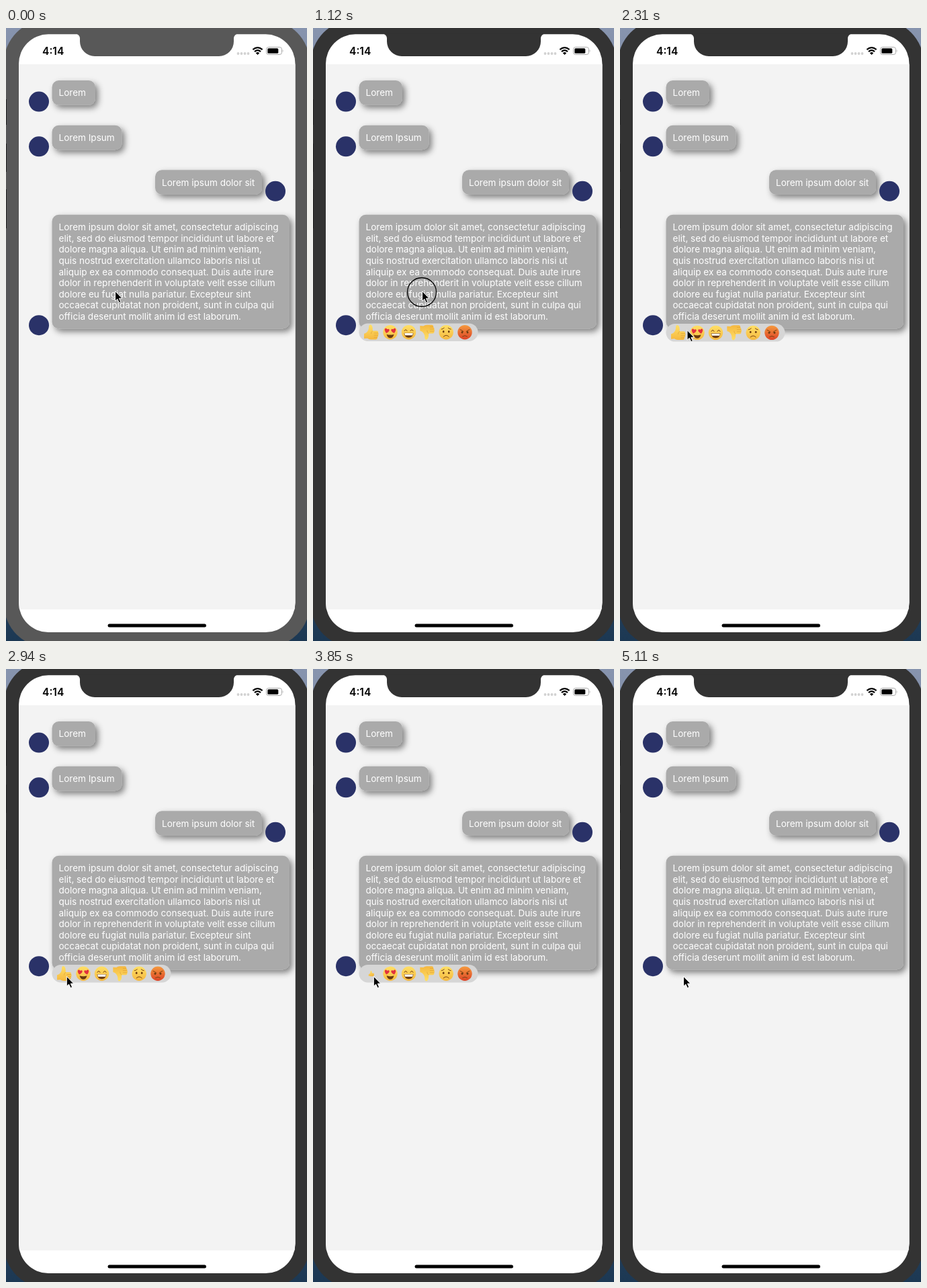
Recreate the animation shown at these times as an HTML page. Size 448 px wide and 912 px high, loop 5.18 s.

```html
<!DOCTYPE html>
<html lang="en">
<head>
<meta charset="utf-8">
<title>Chat reactions</title>
<style>
  html, body { margin: 0; width: 100%; height: 100%; overflow: hidden; }
  svg { display: block; width: 100%; height: 100%; }
  text { font-family: Inter, "Liberation Sans", sans-serif; white-space: pre; }
  .bubble text { font-size: 13.56px; fill: #fff; }
  .bubble rect { fill: #aaa; filter: url(#shadow); }
  .line { fill: none; stroke: #7a4312; stroke-width: 1; stroke-linecap: round; }
  .dark { fill: #6b3a10; }
</style>
</head>
<body>
<svg viewBox="0 0 448 912" xmlns="http://www.w3.org/2000/svg">
  <defs>
    <linearGradient id="wallpaper" x2="0" y2="1">
      <stop stop-color="#8794ae"/><stop offset="1" stop-color="#1c3853"/>
    </linearGradient>
    <linearGradient id="yellow" x2="0" y2="1">
      <stop stop-color="#ffe066"/><stop offset="1" stop-color="#f5b840"/>
    </linearGradient>
    <linearGradient id="red" x2="0" y2="1">
      <stop stop-color="#f59a3e"/><stop offset="1" stop-color="#dd4327"/>
    </linearGradient>
    <filter id="shadow" filterUnits="userSpaceOnUse" x="0" y="50" width="448" height="440">
      <feDropShadow dx="4" dy="4.5" stdDeviation="4.8" flood-opacity=".48"/>
    </filter>
    <clipPath id="screen"><rect x="19" y="9.3" width="411.5" height="889.7" rx="44"/></clipPath>

    <g id="thumb">
      <path fill="url(#yellow)" d="M-11 2C-7 1-5-2-4.2-5C-3.7-7.5-4.4-11-2-11.3C1-11.5 2.2-7 1.7-2.2H7.5Q10.5-2 10 .8Q11.5 2.2 10 4.2Q10.8 6 8.8 7.4Q9.2 10.5 6.5 10.7H-1Q-4 10.7-6 9L-11 9.3Z"/>
      <path class="line" style="stroke:#d99a30;stroke-width:.6" d="M4 1.2H9.5M4 4.4H9.5M4 7.6H8.5M1.5-2Q-.5-.5-.5 2"/>
    </g>
    <circle id="face" r="10.7" fill="url(#yellow)"/>
    <path id="heart" fill="#e2303d" d="M0 4C-6-.5-3-5 0-1.8C3-5 6-.5 0 4"/>
    <g id="love">
      <use href="#face"/>
      <use href="#heart" transform="translate(-5 -2.6) rotate(12)"/>
      <use href="#heart" transform="translate(5 -2.6) rotate(-12)"/>
      <path class="dark" d="M-5.5 3Q0 4.8 5.5 3Q4 8.5 0 8.5T-5.5 3"/>
    </g>
    <g id="grin">
      <use href="#face"/>
      <path class="line" d="M-6.5-2Q-4.5-6-2.5-2M2.5-2Q4.5-6 6.5-2"/>
      <path class="dark" d="M-7 1H7Q6 8 0 8T-7 1"/>
      <path fill="#fff" d="M-6.3 1.3H6.3L5.5 4.5H-5.5Z"/>
    </g>
    <g id="worried">
      <use href="#face"/>
      <ellipse class="dark" cx="-4" cy="-1" rx="1.3" ry="1.7"/>
      <ellipse class="dark" cx="4" cy="-1" rx="1.3" ry="1.7"/>
      <path class="line" d="M-7-4.5Q-4.5-5-3-6.5M7-4.5Q4.5-5 3-6.5M-4 6.5Q0 2.5 4 6.5"/>
    </g>
    <g id="angry">
      <circle r="10.7" fill="url(#red)"/>
      <ellipse class="dark" cx="-4" cy="0" rx="1.4" ry="1.7"/>
      <ellipse class="dark" cx="4" cy="0" rx="1.4" ry="1.7"/>
      <path class="line" d="M-7-4Q-4-3-2-1M7-4Q4-3 2-1M-3.5 6.2Q0 3.5 3.5 6.2"/>
    </g>
  </defs>

  <rect width="448" height="912" fill="url(#wallpaper)"/>
  <rect id="bezel" x="-3" y="-12" width="455" height="933" rx="64"/>
  <path fill="#222" d="M0 106h1v38H0zM0 172h1v42H0zM0 240h1v58H0z"/>

  <g clip-path="url(#screen)">
    <rect y="9" width="448" height="890" fill="#fff"/>
    <rect y="54" width="448" height="811" fill="#f3f3f3"/>
    <g id="messages"></g>
    <g id="popup">
      <rect x="68.5" width="177" height="26.5" rx="13.25" fill="#d6d6d6"/>
      <use id="liked" href="#thumb"/>
      <use href="#love" x="115" y="13.3"/>
      <use href="#grin" x="142.5" y="13.3"/>
      <use href="#thumb" transform="translate(170.3 13) scale(1 -1)"/>
      <use href="#worried" x="198.2" y="13.3"/>
      <use href="#angry" x="226" y="13.3"/>
    </g>
  </g>

  <path id="notch" d="M103 8.5A7 7 0 0 1 110 16V20A22 22 0 0 0 132 42H317A22 22 0 0 0 339 20V16A7 7 0 0 1 346 8.5Z"/>
  <text x="54" y="39.8" font-size="15.6" font-weight="600">4:14</text>
  <path stroke="#d2d2d2" stroke-width="3.8" stroke-linecap="round" stroke-dasharray="0 5" d="M345.5 38h15.2"/>
  <g fill="none" stroke="#000" stroke-width="2.2">
    <path d="M367.4 32.2Q374.5 26 381.6 32.2M370 35.1Q374.5 31.2 379 35.1"/>
    <path fill="#000" stroke="none" d="M371.8 37.2Q374.5 35 377.2 37.2L374.5 40Z"/>
  </g>
  <rect x="387.5" y="28.5" width="23" height="11" rx="3.2" fill="none" stroke="#a8a8a8"/>
  <rect x="389.3" y="30.2" width="16" height="7.6" rx="1.6"/>
  <path fill="#a8a8a8" d="M411.8 32q1.8 2 0 4z"/>
  <rect x="151.5" y="886.5" width="146.5" height="5" rx="2.5"/>

  <circle id="touch" r="21.5" fill="none" stroke="#000" stroke-width="1.3"/>
  <path id="cursor" stroke="#fff" stroke-width="1" d="M0 0V14.8L3.3 11.7L5.8 17.2L8.3 16.1L5.9 10.8H10.4Z"/>
</svg>

<script>
const LOOP = 5180, STEP = 70;
const $ = id => document.getElementById(id);

const LINE = 16.6, PAD = 10;
const messages = [
  { x: 68.5, y: 78, width: 64.5, avatar: 49, lines: ["Lorem"] },
  { x: 68.5, y: 144.7, width: 104, avatar: 49, lines: ["Lorem Ipsum"] },
  { x: 222, y: 211.2, width: 159, avatar: 401, lines: ["Lorem ipsum dolor sit"] },
  { x: 68.5, y: 277.8, width: 353.5, avatar: 49, lines: [
    "Lorem ipsum dolor sit amet, consectetur adipiscing",
    "elit, sed do eiusmod tempor incididunt ut labore et",
    "dolore magna aliqua. Ut enim ad minim veniam,",
    "quis nostrud exercitation ullamco laboris nisi ut",
    "aliquip ex ea commodo consequat. Duis aute irure",
    "dolor in reprehenderit in voluptate velit esse cillum",
    "dolore eu fugiat nulla pariatur. Excepteur sint",
    "occaecat cupidatat non proident, sunt in culpa qui",
    "officia deserunt mollit anim id est laborum."] },
];

$("messages").innerHTML = messages.map(({ x, y, width, avatar, lines }) => {
  const height = lines.length * LINE + 2 * PAD;
  const text = lines.map((line, i) =>
    `<text x="${x + PAD}" y="${y + 23.4 + i * LINE}">${line}</text>`).join("");
  return `<g class="bubble">
    <rect x="${x}" y="${y}" width="${width}" height="${height}" rx="10"/>${text}
    <circle cx="${avatar}" cy="${y + height - 5}" r="15" fill="#2a3268"/></g>`;
}).join("");

const clamp = v => Math.min(1, Math.max(0, v));
const progress = (t, from, to) => clamp((t - from) / (to - from));
const smooth = p => p * p * (3 - 2 * p);
const mix = (a, b, p) => a + (b - a) * p;

// Underdamped step response from 0 to 1, time in seconds.
function spring(s, omega = 15, zeta = 0.25) {
  const wd = omega * Math.sqrt(1 - zeta * zeta);
  return 1 - Math.exp(-zeta * omega * s) * (Math.cos(wd * s) + zeta * omega / wd * Math.sin(wd * s));
}

const cursorPath = [[1820, 162.5, 391.5], [2310, 100, 449.5], [2660, 90.3, 457.3], [5040, 90.3, 457.3], [5110, 94.5, 457.3]];
function cursorAt(t) {
  const next = cursorPath.findIndex(([time]) => t < time);
  if (next === 0) return cursorPath[0].slice(1);
  if (next < 0) return cursorPath.at(-1).slice(1);
  const [t0, x0, y0] = cursorPath[next - 1], [t1, x1, y1] = cursorPath[next];
  const p = smooth(progress(t, t0, t1));
  return [mix(x0, x1, p), mix(y0, y1, p)];
}

const press = (t, down, up) => progress(t, down - STEP, down + STEP) * (1 - progress(t, up - STEP, up + STEP));

function render(t) {
  const shade = mix(88, 51, progress(t, 0, 210));
  for (const id of ["bezel", "notch"]) $(id).setAttribute("fill", `rgb(${shade},${shade},${shade})`);

  const [x, y] = cursorAt(t);
  $("cursor").setAttribute("transform", `translate(${x} ${y})`);
  $("touch").setAttribute("transform", `translate(${x - 0.5} ${y + 1.5})`);
  $("touch").setAttribute("opacity", Math.max(press(t, 560, 1190), press(t, 3290, 3500)));

  const open = t >= 770 && t < 4480;
  const drop = spring((t - 770) / 1000) * (1 - smooth(progress(t, 4130, 4480)));
  $("popup").setAttribute("visibility", open ? "visible" : "hidden");
  $("popup").setAttribute("transform", `translate(0 ${open ? 421 + 19 * drop : 421})`);

  const shrink = progress(t, 3570, 3850) - progress(t, 3850, 4130);
  $("liked").setAttribute("transform", `translate(87 13.3) scale(${1 - 0.62 * shrink})`);
}

function tick(now) {
  render(Math.floor(now % LOOP / STEP) * STEP);
  requestAnimationFrame(tick);
}
render(0);
requestAnimationFrame(tick);
</script>
</body>
</html>
```
